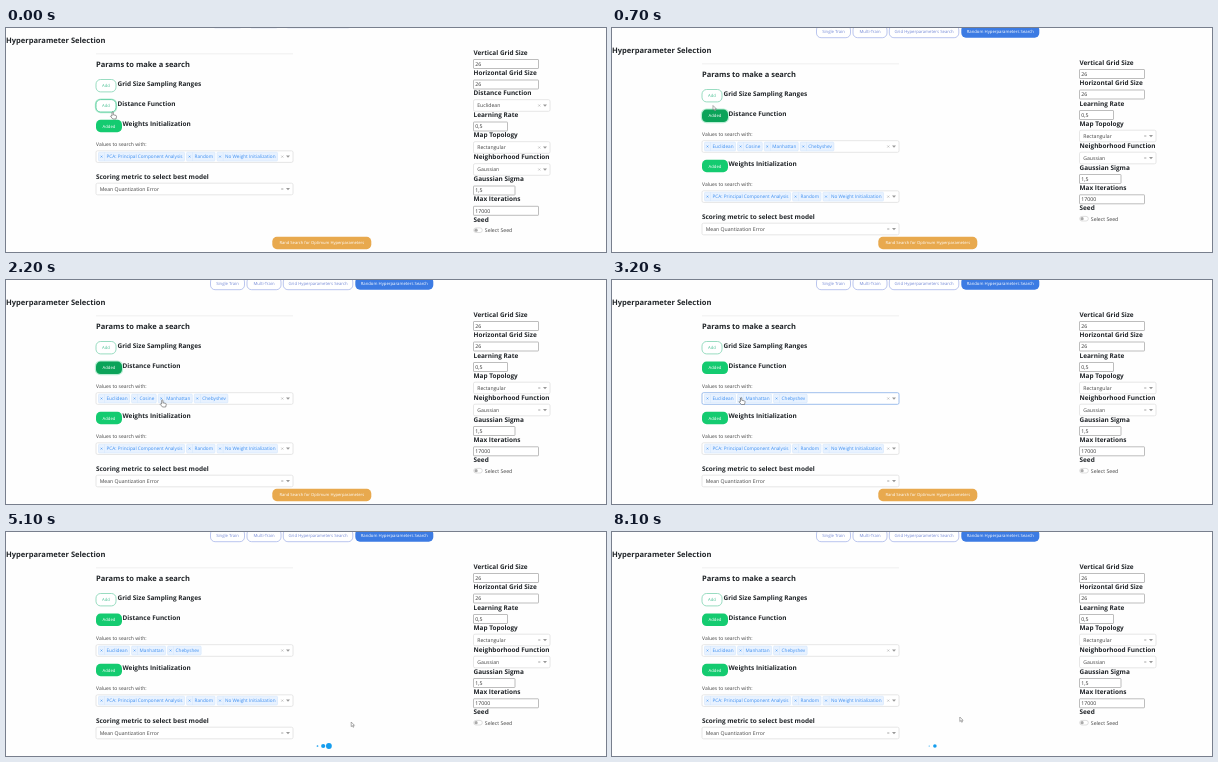
Recreate the animation shown at these times as an HTML page with a canvas. Size 600x224 px, loop 8.2 s.

```html
<!DOCTYPE html>
<html lang="en">
<head>
<meta charset="utf-8">
<title>Hyperparameter selection</title>
<style>
html, body { margin: 0; width: 100%; height: 100%; overflow: hidden; background: #fefefe; }
canvas { display: block; }
</style>
</head>
<body>
<canvas width="600" height="224"></canvas>
<script>
const LOOP = 8200, STEP = 100;
const CLICK = 400, LOADED = 700, REMOVED = 2950, BLUR = 4400, SEARCH = 4500;
const INK = '#212529', GREEN = '#14cb70', DARK_GREEN = '#0ba359', BLUE = '#3c7be3';
const c = document.querySelector('canvas').getContext('2d');
c.textRendering = 'geometricPrecision';

const smooth = u => u * u * (3 - 2 * u);

// y is the middle of the capital letters
function text(s, x, y, size, color = '#444', weight = 400, align = 'left') {
  c.font = `${weight} ${size}px "Open Sans", "Noto Sans", sans-serif`;
  c.textAlign = align;
  c.fillStyle = color;
  c.fillText(s, x, y + size * 0.357);
}

const title = (s, x, y, size = 6.45) => text(s, x, y - 0.4, size, INK, 700);

function box(x, y, w, h, r, fill, stroke, line = 0.8) {
  c.beginPath();
  c.roundRect(x, y - h / 2, w, h, r);
  if (fill) { c.fillStyle = fill; c.fill(); }
  if (stroke) { c.strokeStyle = stroke; c.lineWidth = line; c.stroke(); }
}

function pill(s, x, y, w, fill, color, stroke, size = 4.25) {
  box(x, y, w, 12.4, 4.6, fill, stroke);
  text(s, x + w / 2, y, size, color, 400, 'center');
}

function toggle(y, on, focus, label) {
  const w = on ? 26 : 20;
  if (focus) box(90, y, w, 12.4, 4.6, null, 'rgba(25,200,115,.3)', 2.4);
  if (on) pill('Added', 90, y, w, focus ? DARK_GREEN : GREEN, '#fff');
  else pill('Add', 90, y, w, '#fff', '#4fc297', focus ? '#45c793' : '#7fd3b2');
  title(label, on ? 116.5 : 111.5, y - 1.6);
}

function cross(x, y, color, r = 1) {
  c.beginPath();
  c.moveTo(x - r, y - r); c.lineTo(x + r, y + r);
  c.moveTo(x + r, y - r); c.lineTo(x - r, y + r);
  c.strokeStyle = color;
  c.lineWidth = 0.6;
  c.stroke();
}

function dropdown(x, y, w, value, focus) {
  box(x, y, w, 11.6, 1.5, '#fff', focus ? '#86aee8' : '#e0e0e0');
  const right = x + w;
  cross(right - 10.7, y, '#aaa');
  c.beginPath();
  c.moveTo(right - 7, y - 1); c.lineTo(right - 3, y - 1); c.lineTo(right - 5, y + 1.2);
  c.fillStyle = '#999';
  c.fill();
  if (value) text(value, x + 3.7, y, 5.15);
}

function multi(y, names, focus) {
  dropdown(90, y, 197, '', focus);
  let x = 92.5;
  for (const name of names) {
    c.font = '4.7px "Open Sans", "Noto Sans", sans-serif';
    const w = c.measureText(name).width + 10;
    box(x, y, w, 8.8, 1, '#e8f2ff', '#d3e6fc', 0.6);
    cross(x + 3, y, '#3f93f2', 0.9);
    c.fillStyle = '#d3e6fc';
    c.fillRect(x + 5.8, y - 4.4, 0.5, 8.8);
    text(name, x + 8, y, 4.7, '#3a8df0');
    x += w + 2;
  }
}

function input(value, y, w) {
  box(467.5, y, w, 9, 0.5, '#fff', '#adadad');
  text(value, 469.3, y, 5.2, '#333');
}

function tabs() {
  const list = [['Single Train', 204.5, 34], ['Multi-Train', 241, 34],
    ['Grid Hyperparameters Search', 277.3, 69.5], ['Random Hyperparameters Search', 349.3, 78]];
  list.forEach(([s, x, w], i) =>
    i < 3 ? pill(s, x, 6, w, '#fff', '#7489d6', '#a9b7ea') : pill(s, x, 6, w, BLUE, '#fff'));
}

function settings(t) {
  title('Vertical Grid Size', 467.5, 38);
  input('26', 48.5, 65);
  title('Horizontal Grid Size', 467.5, 58);
  input('26', 69, 65);
  if (t < LOADED) title('Distance Function', 467.5, 78);
  if (t < CLICK) dropdown(467.5, 90, 76.5, 'Euclidean');
  const y = t < CLICK ? 100 : t < LOADED ? 87.5 : 78.5;
  title('Learning Rate', 467.5, y);
  input('0,5', y + 11, 34);
  title('Map Topology', 467.5, y + 20);
  dropdown(467.5, y + 32, 76.5, 'Rectangular');
  title('Neighborhood Function', 467.5, y + 42);
  dropdown(467.5, y + 54, 76.5, 'Gaussian');
  title('Gaussian Sigma', 467.5, y + 64);
  input('1,5', y + 75, 41.5);
  title('Max Iterations', 467.5, y + 84);
  input('17000', y + 95.3, 65);
  title('Seed', 467.5, y + 104.3);
  box(467.7, y + 114.7, 8.6, 4.6, 2.3, '#fff', '#d2d2d2', 0.7);
  c.beginPath();
  c.arc(470.1, y + 114.7, 1.6, 0, 7);
  c.fillStyle = '#aaa';
  c.fill();
  text('Select Seed', 478.8, y + 114.7, 5.2);
}

function params(t) {
  const added = t >= CLICK, loaded = t >= LOADED;
  c.fillStyle = '#ececec';
  c.fillRect(90, 38, 197, 0.8);
  title('Params to make a search', 90, 49.4, 7.5);
  toggle(70.2, false, false, 'Grid Size Sampling Ranges');
  toggle(90.3, added, t < REMOVED, 'Distance Function');
  if (added) text('Values to search with:', 90, 108.7, 5);
  if (loaded) {
    const names = ['Euclidean', 'Cosine', 'Manhattan', 'Chebyshev'];
    if (t >= REMOVED) names.splice(1, 1);
    multi(121, names, t >= REMOVED && t < BLUR);
  }
  const y = loaded ? 140.5 : added ? 128 : 110.5;
  toggle(y, true, false, 'Weights Initialization');
  text('Values to search with:', 90, y + 18.5, 5);
  multi(y + 30.6, ['PCA: Principal Component Analysis', 'Random', 'No Weight Initialization']);
  title('Scoring metric to select best model', 90, y + 50.6);
  dropdown(90, y + 63, 197, 'Mean Quantization Error');
}

function dots(age) {
  for (let i = 0; i < 3; i++) {
    const p = (age + 320 - 160 * i) % 1400 / 560;
    const scale = p < 2 ? smooth(1 - Math.abs(1 - p)) : 0;
    c.beginPath();
    c.arc(311.5 + 5.7 * i, 214, 2.95 * scale, 0, 7);
    c.fillStyle = '#159dee';
    c.fill();
  }
}

function footer(t) {
  if (t >= SEARCH) return dots(t - SEARCH);
  if (t >= CLICK && t < LOADED) return dots(t - CLICK);
  const hover = t >= 4200;
  pill('Rand Search for Optimum Hyperparameters', 266.3, 215, 99,
    hover ? '#e0a248' : '#e8a94e', hover ? '#fae6c4' : '#fff', null, 4.12);
}

const PATH = [[0, 106, 84], [350, 101, 77.5], [900, 101, 77.5], [2000, 155.7, 120], [2300, 155.7, 120],
  [2700, 128.5, 117.5], [3200, 128.5, 117.5], [4200, 331, 217], [4500, 331, 217], [5300, 347.8, 185], [LOOP, 347.8, 185]];
const HAND = new Path2D('M0 .4Q.8-.4 1.3.4V2.8L4 3.4Q4.7 3.7 4.5 4.8L4 7H.8L-1.5 4.3Q-1.4 3.4 0 4Z');
const ARROW = new Path2D('M0 0V4.6L1.1 3.6 1.9 5.3 2.7 4.9 1.9 3.3H3.3Z');

function cursor(t) {
  const i = PATH.findIndex(p => p[0] > t);
  const [t0, x0, y0] = PATH[i - 1], [t1, x1, y1] = PATH[i];
  const u = smooth((t - t0) / (t1 - t0));
  const hand = t < 650 || (t > 1900 && t < 3300) || (t > 4000 && t < 4700);
  const shape = hand ? HAND : ARROW;
  c.save();
  c.translate(x0 + (x1 - x0) * u, y0 + (y1 - y0) * u);
  c.fillStyle = '#fff';
  c.fill(shape);
  c.strokeStyle = hand ? '#555' : '#777';
  c.lineWidth = 0.6;
  c.stroke(shape);
  c.restore();
}

function draw(now) {
  const t = Math.floor(now % LOOP / STEP) * STEP;
  c.fillStyle = '#fefefe';
  c.fillRect(0, 0, 600, 224);
  c.save();
  c.translate(0, t < CLICK ? -12.5 : t < LOADED ? 0 : -2.5);
  tabs();
  title('Hyperparameter Selection', 0, 25.5, 7.55);
  params(t);
  settings(t);
  c.restore();
  footer(t);
  cursor(t);
}

const start = performance.now();
function tick() {
  draw(performance.now() - start);
  requestAnimationFrame(tick);
}
tick();
</script>
</body>
</html>
```
